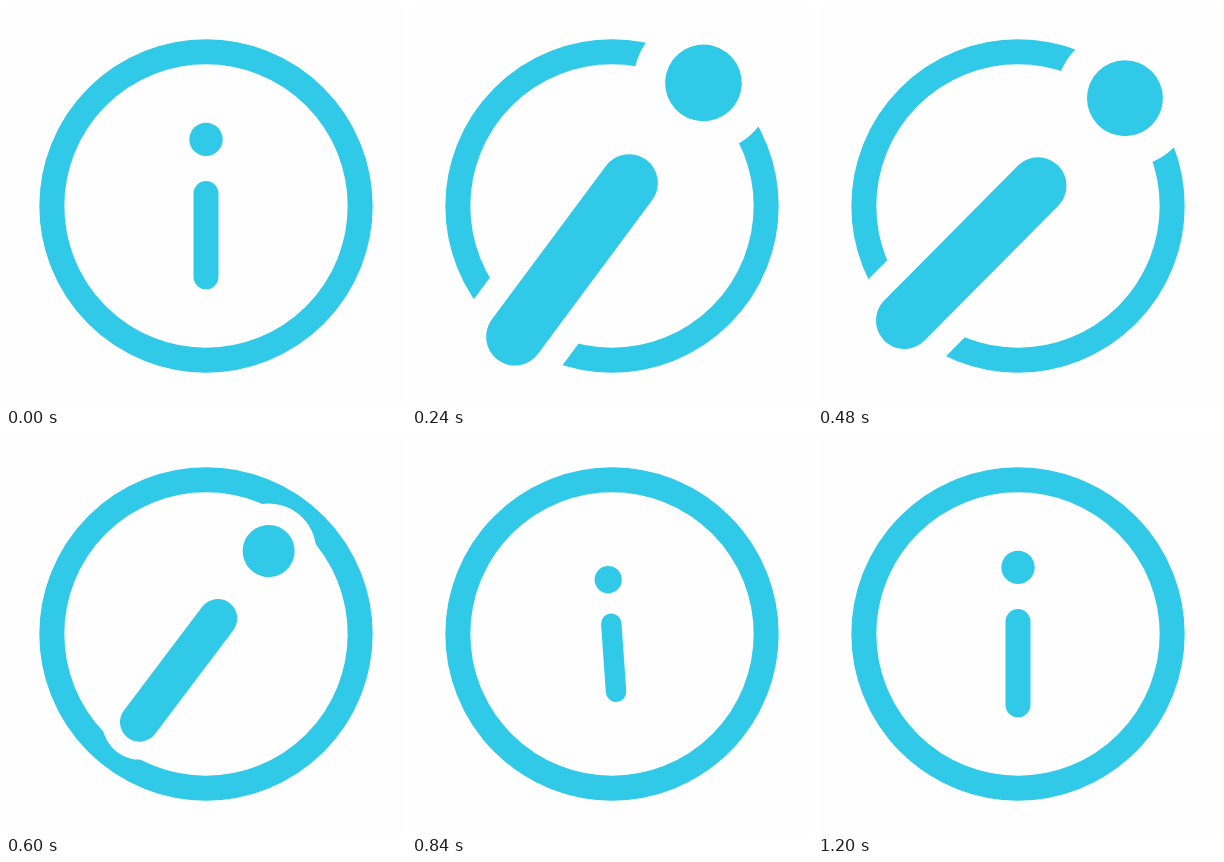
An HTML page that plays this animation: 400 by 400 pixels, repeating every 3.23 s.

```html
<!DOCTYPE html>
<html lang="en">
<head>
<meta charset="utf-8">
<title>Info icon</title>
<style>
  html, body { margin: 0; width: 100%; height: 100%; overflow: hidden; background: #fefefe; }
  svg { display: block; width: 100%; height: 100%; }
  .ink { fill: #30c9e8; stroke: #30c9e8; }
  .gap { fill: #fefefe; stroke: #fefefe; }
  line { stroke-linecap: round; }
  circle { stroke: none; }
  .ring { fill: none; stroke: #30c9e8; stroke-width: 25; }
</style>
</head>
<body>
<svg viewBox="0 0 400 400">
  <circle class="ring" cx="200" cy="200" r="154.17"/>
  <g id="mark">
    <g class="gap">
      <circle cy="-66.67" r="30.5"/>
      <line y1="-12.5" y2="70.83" stroke-width="48"/>
    </g>
    <g class="ink">
      <circle cy="-66.67" r="16.67"/>
      <line y1="-12.5" y2="70.83" stroke-width="25"/>
    </g>
  </g>
</svg>
<script>
  const LOOP = 3230, STEP = 30, END = 1200;
  const mark = document.getElementById('mark');

  // [time in ms, value, ease strength towards the next key]
  const scaleKeys = [[0, 1, .36], [240, 2.3, 0], [452, 2.3, .46], [750, .8, .4], [1200, 1, 0]];
  const turnKeys = [[0, 0, .37], [336, 45, 0], [452, 45, .48], [985, -11.6, .4], [1200, 0, 0]];

  // cubic-bezier(a, 0, 1 - a, 1), solved by bisection
  function ease(x, a) {
    let lo = 0, hi = 1, u = x;
    for (let i = 0; i < 24; i++) {
      u = (lo + hi) / 2;
      const v = 1 - u;
      const bx = 3 * v * v * u * a + 3 * v * u * u * (1 - a) + u * u * u;
      if (bx < x) lo = u; else hi = u;
    }
    return u * u * (3 - 2 * u);
  }

  function valueAt(keys, t) {
    for (let i = 1; i < keys.length; i++) {
      const [t0, v0, a] = keys[i - 1], [t1, v1] = keys[i];
      if (t < t1) return v0 + (v1 - v0) * ease((t - t0) / (t1 - t0), a);
    }
    return keys[keys.length - 1][1];
  }

  function draw(ms) {
    const t = Math.min(END, Math.floor(ms / STEP) * STEP);
    const turn = valueAt(turnKeys, t), scale = valueAt(scaleKeys, t);
    mark.setAttribute('transform', `translate(200 200) rotate(${turn}) scale(${scale})`);
  }

  const start = performance.now();
  function tick() {
    draw((performance.now() - start) % LOOP);
    requestAnimationFrame(tick);
  }
  tick();
</script>
</body>
</html>
```
